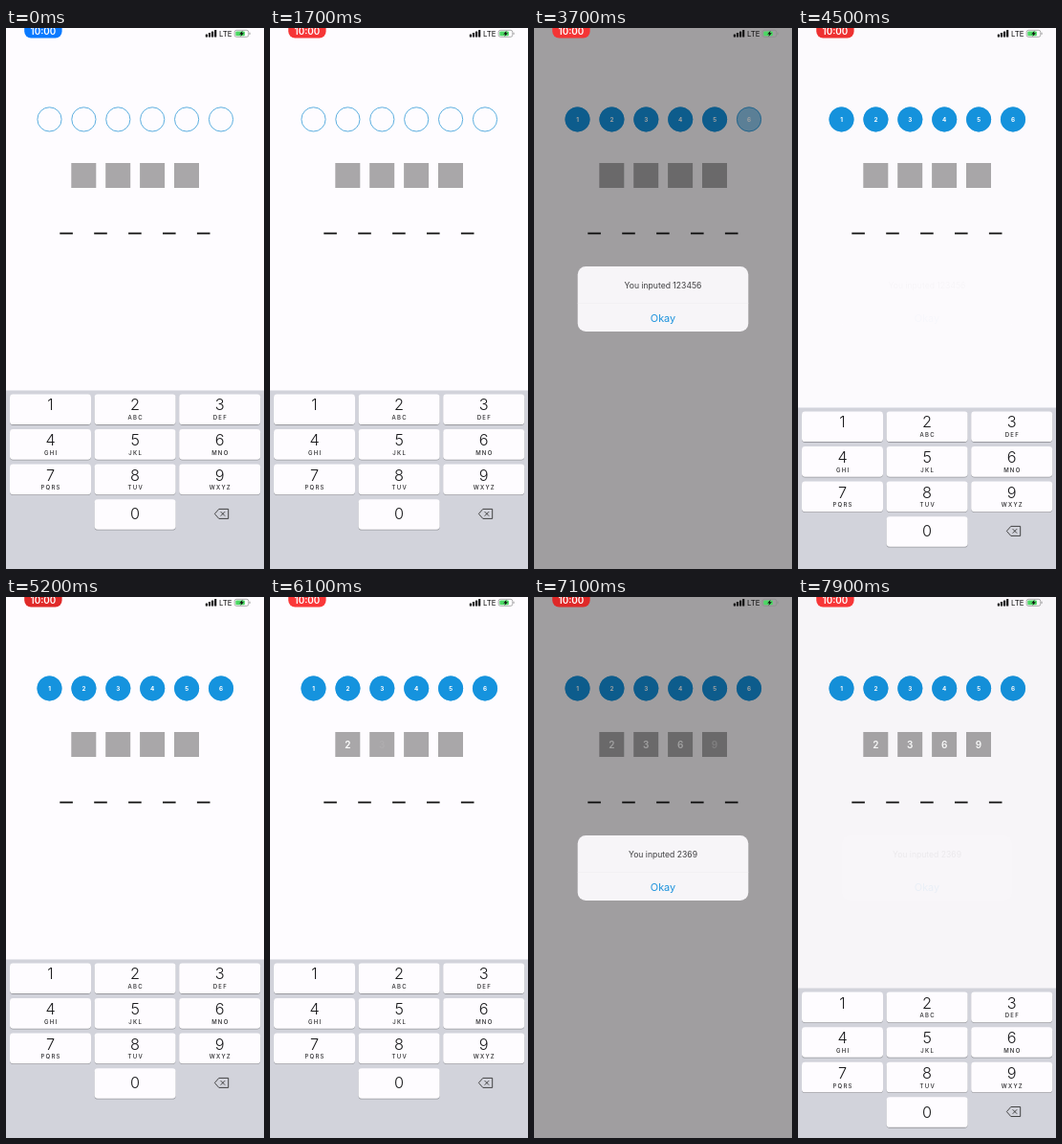
An HTML page with a canvas that plays this animation: 270 by 565 pixels, repeating every 8 s.

```html
<!DOCTYPE html>
<html lang="en">
<head>
<meta charset="utf-8">
<style>
  html, body { margin: 0; width: 100%; height: 100%; overflow: hidden; background: #fefcff; }
  canvas { display: block; width: 270px; height: 565px; }
</style>
</head>
<body>
<canvas id="stage"></canvas>
<script>
const LOOP = 8000, W = 270, H = 565, PITCH = 35.9;
const BLUE = '#1593de', PAPER = '#fefcff';
const canvas = document.getElementById('stage');
const ctx = canvas.getContext('2d');
const ratio = window.devicePixelRatio || 1;
canvas.width = W * ratio;
canvas.height = H * ratio;
ctx.scale(ratio, ratio);

// Key taps: digit and release time in ms.
const roundCode = [[1, 1700], [2, 2120], [3, 2480], [4, 2790], [5, 3070], [6, 3380]];
const squareCode = [[2, 5600], [3, 5900], [6, 6400], [9, 6800]];
const taps = [...roundCode, ...squareCode];
const TAP_HOLD = 110, FADE_DELAY = 180, FADE = 300;

const dialogs = [
  { text: 'You inputed 123456', open: 3380, close: 4190, keysBack: 4285 },
  { text: 'You inputed 2369', open: 6790, close: 7662, keysBack: 7721 }
];
const letters = ['', '', 'ABC', 'DEF', 'GHI', 'JKL', 'MNO', 'PQRS', 'TUV', 'WXYZ'];

const clamp = v => Math.max(0, Math.min(1, v));
// Critically damped spring running from 0 to 1.
const spring = (ms, rate) => {
  const x = Math.max(0, ms) / 1000 * rate;
  return 1 - (1 + x) * Math.exp(-x);
};

function box(x, y, w, h, r, fill) {
  ctx.fillStyle = fill;
  ctx.beginPath();
  ctx.roundRect(x, y, w, h, r);
  ctx.fill();
}

function label(text, x, y, size, color, weight = 400, spacing = 0) {
  ctx.font = `${weight} ${size}px Inter, sans-serif`;
  ctx.letterSpacing = spacing + 'px';
  ctx.textAlign = 'center';
  ctx.textBaseline = 'alphabetic';
  ctx.fillStyle = color;
  ctx.fillText(text, x + spacing / 2, y + size * 0.364);
}

function polygon(points) {
  ctx.beginPath();
  points.forEach(([x, y]) => ctx.lineTo(x, y));
  ctx.closePath();
}

function drawFields(t) {
  const shown = tap => clamp((t - tap[1] - FADE_DELAY) / FADE);

  for (let i = 0; i < 6; i++) {
    const x = 45.5 + i * PITCH, y = 95.4;
    ctx.beginPath();
    ctx.arc(x, y, 12.6, 0, 7);
    ctx.strokeStyle = '#4ba6dc';
    ctx.lineWidth = 0.9;
    ctx.stroke();
    ctx.globalAlpha = shown(roundCode[i]);
    ctx.beginPath();
    ctx.arc(x, y, 13, 0, 7);
    ctx.fillStyle = BLUE;
    ctx.fill();
    ctx.globalAlpha = 1;
    if (shown(roundCode[i])) label(roundCode[i][0], x, y, 6.3, '#fff', 700);
  }
  for (let i = 0; i < 4; i++) {
    const x = 68.3 + i * PITCH;
    box(x, 141, 26, 26, 0, '#a9a7a9');
    ctx.globalAlpha = shown(squareCode[i]);
    label(squareCode[i][0], x + 13, 154, 10, '#fff', 600);
    ctx.globalAlpha = 1;
  }
  for (let i = 0; i < 5; i++) box(56.3 + i * PITCH, 213.6, 13.6, 1.8, 0, '#111');
}

function drawStatus(t) {
  const red = clamp((t - 350) / 200);
  const dim = red * (0.5 + 0.5 * Math.cos((t - 3000) / 2050 * 2 * Math.PI));
  const mix = (a, b, c) => a + (b - a) * red - c * dim;
  box(19.2, -8, 39.4, 18.5, 7,
    `rgb(${mix(10, 250, 27)},${mix(122, 56, 15)},${mix(255, 57, 17)})`);
  label('10:00', 38.9, 3.7, 9.8, '#fff', 600);

  for (let i = 0; i < 4; i++) {
    const h = 3 + i * 1.5;
    box(208.8 + i * 3.1, 9.5 - h, 2.2, h, 0.6, '#111');
  }
  label('LTE', 229.7, 6, 7.9, '#111');

  ctx.strokeStyle = '#8b8b8c';
  ctx.lineWidth = 0.7;
  ctx.beginPath();
  ctx.roundRect(239.2, 2.3, 14.6, 7, 2);
  ctx.stroke();
  box(240.3, 3.4, 9.6, 4.8, 1, '#4cd964');
  box(254.6, 4.6, 0.9, 2.4, 0.5, '#8b8b8c');
  polygon([[247.6, 2.7], [244.2, 6.4], [246.2, 6.4], [245.4, 9], [248.9, 5.3], [246.9, 5.3]]);
  ctx.fillStyle = '#111';
  ctx.fill();
}

function drawKey(digit, col, row, t) {
  const x = 4 + col * 88.6, y = 382.5 + row * 36.55, center = x + 42.5;
  const pressed = taps.some(([d, up]) => d === digit && t >= up - TAP_HOLD && t < up);
  box(x, y + 0.8, 85, 31.6, 3.4, '#9a9ba0');
  box(x, y, 85, 31.6, 3.4, pressed ? '#b5bfd0' : PAPER);
  label(digit, center, y + (digit ? 11 : 15.4), 16.3, '#1c1c1e', 300);
  if (letters[digit]) label(letters[digit], center, y + 24.6, 6, '#2a2a2c', 500, 1.25);
}

function drawKeyboard(t) {
  let hidden = 0;
  for (const d of dialogs) {
    if (t >= d.open) hidden = spring(t - d.open, 24) - spring(t - d.keysBack, 18.26);
  }
  ctx.save();
  ctx.translate(0, hidden * 188);
  box(0, 378.5, W, 200, 0, '#d2d3db');
  for (let n = 1; n <= 9; n++) drawKey(n, (n - 1) % 3, Math.floor((n - 1) / 3), t);
  drawKey(0, 1, 3, t);

  ctx.strokeStyle = '#333';
  ctx.lineWidth = 0.9;
  ctx.lineJoin = 'round';
  polygon([[218.4, 507.4], [222.8, 502.4], [232.7, 502.4], [232.7, 512.4], [222.8, 512.4]]);
  ctx.stroke();
  ctx.beginPath();
  ctx.moveTo(224.7, 505.2);
  ctx.lineTo(229.1, 509.6);
  ctx.moveTo(229.1, 505.2);
  ctx.lineTo(224.7, 509.6);
  ctx.stroke();
  ctx.restore();
}

function drawDialog(d, alpha, scale) {
  ctx.save();
  ctx.globalAlpha = alpha;
  ctx.translate(135, 283);
  ctx.scale(scale, scale);
  ctx.translate(-135, -283);
  box(45.8, 249, 178.4, 68, 8.5, '#f8f6f9');
  box(45.8, 287.3, 178.4, 0.5, 0, '#eeecef');
  label(d.text, 135, 268.8, 8.6, '#3c3c3e');
  label('Okay', 135, 302.6, 10.9, '#1a91dc');
  ctx.restore();
}

function draw() {
  const t = performance.now() % LOOP;
  box(0, 0, W, H, 0, PAPER);
  drawFields(t);

  const dialog = dialogs.findLast(d => t >= d.open);
  let alpha = 0, scale = 1;
  if (dialog) {
    const opened = spring(t - dialog.open, 22);
    alpha = clamp(opened - spring(t - dialog.close, 18.26));
    scale = 1.15 - 0.15 * opened;
    box(0, 0, W, H, 0, `rgba(0,0,0,${alpha * 0.375})`);
  }
  drawKeyboard(t);
  if (dialog) drawDialog(dialog, alpha, scale);
  drawStatus(t);
  requestAnimationFrame(draw);
}
draw();
</script>
</body>
</html>
```
